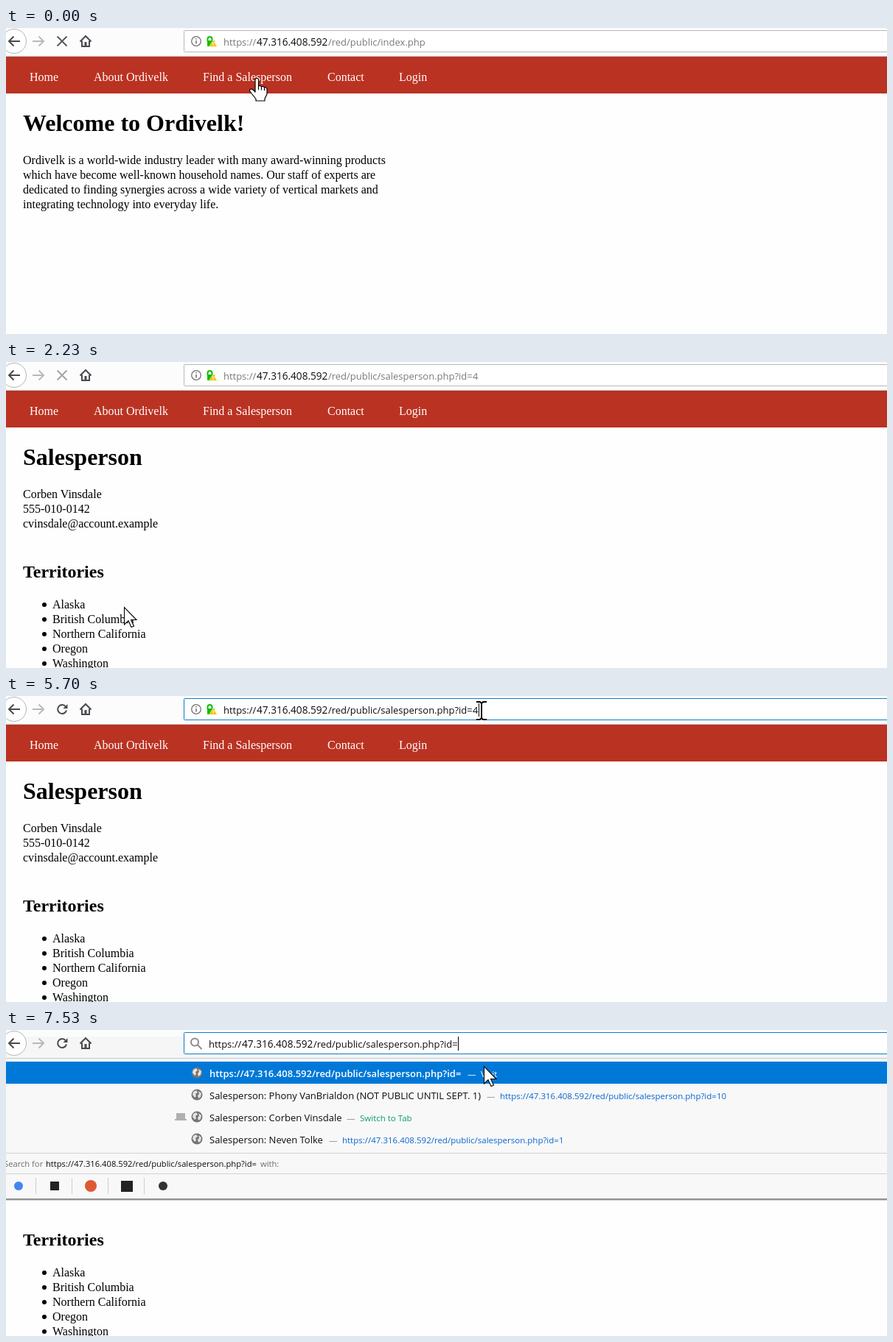
Recreate the animation shown at these times as an HTML page. Size 1195 by 416 pixels, loop 8000 ms.

```html
<!DOCTYPE html>
<html lang="en">
<head>
<meta charset="utf-8">
<title>Browser session</title>
<style>
html, body { margin: 0; width: 100%; height: 100%; overflow: hidden; background: #fff; }
svg { display: block; width: 1195px; height: 416px; }
.page { font: 16px "Liberation Serif", "Times New Roman", serif; }
.h1 { font-size: 32px; font-weight: bold; }
.h2 { font-size: 24px; font-weight: bold; }
.link { fill: #0000ee; text-decoration: underline; }
.ui { font: 13px "Open Sans", "Noto Sans", sans-serif; }
.host { font-size: 13.6px; }
.small { font-size: 11.5px; }
.line { fill: none; stroke: #4a4a4f; stroke-width: 2; }

/* Every layer runs on one shared 8 s clock with hard cuts. */
.a { animation: 8s step-end infinite; }

.home { animation-name: home; }
.list { animation-name: list; }
.person { animation-name: person; }
@keyframes home { 0% { visibility: visible } 3.375%, 100% { visibility: hidden } }
@keyframes list { 0% { visibility: hidden } 3.375% { visibility: visible } 26.125%, 100% { visibility: hidden } }
@keyframes person { 0% { visibility: hidden } 26.125%, 100% { visibility: visible } }

.stop { animation-name: stop; stroke-width: 1.8; }
.reload { animation-name: reload; }
@keyframes stop {
  0% { visibility: visible; stroke: #55555a }
  24.25% { visibility: visible; stroke: #a2a2a5 }
  8.625%, 36.375%, 100% { visibility: hidden }
}
@keyframes reload { 0%, 24.25% { visibility: hidden } 8.625%, 36.375%, 100% { visibility: visible } }

.url { animation-name: url; }
.dim { animation-name: dim; }
.host { animation-name: host; }
.path1 { animation-name: path1; }
.path2 { animation-name: path2; }
.path3 { animation-name: person; }
.digit { animation-name: digit; }
.select { animation-name: select; }
.field { animation-name: field; }
@keyframes url { 0% { transform: translate(295px, 24px) } 85.625%, 100% { transform: translate(275px, 24px) } }
@keyframes dim { 0% { fill: #797979 } 62.5%, 71.25%, 100% { fill: #0c0c0d } 64.375% { fill: #fff } }
@keyframes host { 0%, 71.25%, 100% { fill: #0c0c0d } 64.375% { fill: #fff } }
@keyframes path1 { 0% { visibility: visible } 1.75%, 100% { visibility: hidden } }
@keyframes path2 { 0% { visibility: hidden } 1.75% { visibility: visible } 26.125%, 100% { visibility: hidden } }
@keyframes digit { 0% { visibility: hidden } 26.125% { visibility: visible } 85.625%, 100% { visibility: hidden } }
@keyframes select { 0% { visibility: hidden } 64.375% { visibility: visible } 71.25%, 100% { visibility: hidden } }
@keyframes field { 0% { stroke: #b8b8b8 } 62.5%, 100% { stroke: #0f7bc8 } }

.caret { animation-name: caret; }
@keyframes caret {
  0%, 64.375%, 76.75%, 89.125% { visibility: hidden }
  62.5% { visibility: visible; transform: translateX(633px) }
  71.25%, 81.875% { visibility: visible; transform: translateX(641px) }
  85.625%, 94.125%, 100% { visibility: visible; transform: translateX(613px) }
}

.site { animation-name: site; }
.search { animation-name: search; }
.drop { animation-name: drop; }
@keyframes site { 0% { visibility: visible } 85.625%, 100% { visibility: hidden } }
@keyframes search { 0% { visibility: hidden } 85.625%, 100% { visibility: visible } }
@keyframes drop { 0% { visibility: hidden } 87.375%, 100% { visibility: visible } }

.pointer { animation-name: move; }
@keyframes move {
  0% { transform: translate(340px, 70px) }
  5.125% { transform: translate(338px, 92px) }
  6.875% { transform: translate(300px, 150px) }
  8.625% { transform: translate(232px, 228px) }
  10.375% { transform: translate(172px, 281px) }
  12.125% { transform: translate(168px, 293px) }
  13.875% { transform: translate(165px, 304px) }
  15.625% { transform: translate(162px, 320px) }
  17.25% { transform: translate(160px, 333px) }
  36.375% { transform: translate(175px, 320px) }
  38.25% { transform: translate(222px, 290px) }
  40% { transform: translate(290px, 250px) }
  41.875% { transform: translate(365px, 212px) }
  43.625% { transform: translate(432px, 178px) }
  45.5% { transform: translate(480px, 152px) }
  47.375% { transform: translate(513px, 135px) }
  49.125% { transform: translate(576px, 72px) }
  50.75% { transform: translate(606px, 48px) }
  52.5% { transform: translate(624px, 26px) }
  54.125% { transform: translate(632px, 21px) }
  55.75% { transform: translate(637px, 19px) }
  59.125% { transform: translate(640px, 19px) }
  64.375% { transform: translate(643px, 20px) }
  67.75% { transform: translate(645px, 20px) }
  74.875% { transform: translate(647px, 40px) }
  76.75%, 100% { transform: translate(648px, 49px) }
}
.hand { animation-name: hand; }
.arrow { animation-name: arrow; }
.beam { animation-name: beam; }
@keyframes hand { 0%, 15.625% { visibility: visible } 5.125%, 26.125%, 100% { visibility: hidden } }
@keyframes arrow { 0%, 15.625%, 52.5% { visibility: hidden } 5.125%, 26.125%, 74.875%, 100% { visibility: visible } }
@keyframes beam { 0%, 74.875%, 100% { visibility: hidden } 52.5% { visibility: visible } }
</style>
</head>
<body>
<svg viewBox="0 0 1195 416">
  <defs>
    <g id="globe">
      <circle r="7.5" fill="#747474"/>
      <path d="M-5-4L-1-6 1-3-2-1-1 2-3 4-6 0zM2-5L6-2 5 3 2 5 1 1 3-1z" fill="#e4e4e4"/>
    </g>
  </defs>
  <rect width="1195" height="416" fill="#fefefe"/>

  <g class="page">
    <rect y="39" width="1195" height="50" fill="#ba3222"/>
    <g fill="#fff">
      <text x="32" y="72">Home</text>
      <text x="119" y="72">About Ordivelk</text>
      <text x="267" y="72">Find a Salesperson</text>
      <text x="436" y="72">Contact</text>
      <text x="533" y="72">Login</text>
    </g>

    <g class="a home">
      <text class="h1" x="23" y="140">Welcome to Ordivelk!</text>
      <text x="23" y="185">Ordivelk is a world-wide industry leader with many award-winning products</text>
      <text x="23" y="205">which have become well-known household names. Our staff of experts are</text>
      <text x="23" y="225">dedicated to finding synergies across a wide variety of vertical markets and</text>
      <text x="23" y="245">integrating technology into everyday life.</text>
    </g>

    <g class="a list">
      <text class="h1" x="23" y="140">Find a Salesperson</text>
      <text x="23" y="185">Use the list below to find a salesperson nearby. We are ready to serve you!</text>
      <text x="23" y="221" font-weight="bold">UNITED STATES</text>
      <text x="23" y="257">Alabama (AL)</text>
      <text class="link" x="63" y="277">Neven Tolke</text>
      <text x="23" y="313">Alaska (AK)</text>
      <text class="link" x="63" y="333">Corben Vinsdale</text>
      <text x="23" y="369">Arizona (AZ)</text>
      <text class="link" x="63" y="389">Judit Fondel</text>
      <text x="23" y="425">Arkansas (AR)</text>
      <path d="M49 269h6v6h-6zM49 325h6v6h-6zM49 381h6v6h-6z"/>
    </g>

    <g class="a person">
      <text class="h1" x="23" y="140">Salesperson</text>
      <text x="23" y="185">Corben Vinsdale</text>
      <text x="23" y="205">555-010-0142</text>
      <text x="23" y="225">cvinsdale@account.example</text>
      <text class="h2" x="23" y="293">Territories</text>
      <text x="63" y="335">Alaska</text>
      <text x="63" y="355">British Columbia</text>
      <text x="63" y="375">Northern California</text>
      <text x="63" y="395">Oregon</text>
      <text x="63" y="415">Washington</text>
      <path d="M52 330h0M52 350h0M52 370h0M52 390h0M52 410h0" stroke="#000" stroke-width="6" stroke-linecap="round"/>
    </g>
  </g>

  <!-- toolbar -->
  <rect width="1195" height="38" fill="#fcfcfc"/>
  <rect class="a search" y="9" width="1195" height="29" fill="#f6f6f7"/>
  <rect y="38" width="1195" height="1" fill="#c6c6c6"/>
  <circle cx="11" cy="18" r="16.5" fill="#fff" stroke="#b5b5b5"/>
  <path class="line" d="M19 18H4M10.500 11.500L4 18l6.500 6.500"/>
  <path class="line" style="stroke:#b9b9b9" d="M36 18H51M44.500 11.500L51 18l-6.500 6.500"/>
  <path class="a stop" fill="none" d="M69.500 11.500l13 13M82.500 11.500l-13 13"/>
  <g class="a reload">
    <path class="line" d="M81 14.500A6 6 0 1 0 82 19.500"/>
    <path d="M83.500 11v6h-6z" fill="#4a4a4f"/>
  </g>
  <path class="line" d="M100.500 18.500L108 11l7.500 7.500M103 17.500V25h10V17.500"/>
  <path d="M106.500 19h3v6h-3z" fill="#4a4a4f"/>

  <rect class="a field" x="241.500" y="3.500" width="980" height="29" rx="1" fill="#fff" stroke="#b8b8b8"/>
  <g class="a site">
    <circle cx="258" cy="18" r="6.300" fill="none" stroke="#737373" stroke-width="1.300"/>
    <path d="M258 17v4.500M258 14v1.500" stroke="#737373" stroke-width="1.600"/>
    <path d="M273.500 18v-3a3 3 0 0 1 6 0v2" fill="none" stroke="#12bc00" stroke-width="2"/>
    <rect x="273" y="17" width="10" height="8" rx="1" fill="#12bc00"/>
    <path d="M281 16.500l5.500 9h-11z" fill="#ffbf00" stroke="#fff" stroke-width=".6"/>
    <path d="M281 19.500v3M281 23.300v1.200" stroke="#fff" stroke-width="1.200"/>
  </g>
  <g class="a search" fill="none" stroke="#8a8a8a" stroke-width="2">
    <circle cx="256" cy="16.500" r="5"/>
    <path d="M259.500 20l6 6"/>
  </g>
  <rect class="a select" x="295" y="9" width="346" height="19" fill="#0078d7"/>
  <g class="ui a url">
    <text class="a dim">https://</text>
    <text class="a host" x="45">47.316.408.592</text>
    <g class="a dim">
      <text class="a path1" x="142">/red/public/index.php</text>
      <text class="a path2" x="142">/red/public/territories.php</text>
      <text class="a path3" x="142">/red/public/salesperson.php?id=</text>
      <text class="a digit" x="338">4</text>
    </g>
  </g>
  <rect class="a caret" y="9" width="1" height="19"/>

  <!-- suggestions -->
  <g class="ui a drop">
    <rect y="39" width="1195" height="191" fill="#f8f8f8"/>
    <rect y="43" width="1195" height="30" fill="#0078d7"/>
    <path d="M0 167.500H1195M0 195.500H1195" stroke="#d2d2d2"/>
    <rect y="229" width="1195" height="2" fill="#929292"/>
    <rect y="231" width="1195" height="1" fill="#cfcfcf"/>
    <path d="M40.500 201v22M89.500 201v22M138.500 201v22M187.500 201v22" stroke="#cfcfcf"/>
    <use href="#globe" x="259" y="58"/>
    <use href="#globe" x="259" y="88"/>
    <use href="#globe" x="259" y="118"/>
    <use href="#globe" x="259" y="148"/>
    <path d="M231 113h12v8h2v2h-16v-2h2z" fill="#b0b0b0"/>

    <g fill="#fff">
      <text x="276" y="64" font-weight="600">https://47.316.408.592/red/public/salesperson.php?id=</text>
      <text class="small" x="626" y="64">—</text>
      <text class="small" x="644" y="64">Visit</text>
    </g>
    <g fill="#0c0c0d">
      <text x="276" y="94">Salesperson: Phony VanBrialdon (NOT PUBLIC UNTIL SEPT. 1)</text>
      <text x="276" y="124">Salesperson: Corben Vinsdale</text>
      <text x="276" y="154">Salesperson: Neven Tolke</text>
    </g>
    <g class="small" fill="#8a8a8a">
      <text x="652" y="94">—</text>
      <text x="462" y="124">—</text>
      <text x="438" y="154">—</text>
    </g>
    <g class="small" fill="#0a66cf">
      <text x="670" y="94">https://47.316.408.592/red/public/salesperson.php?id=10</text>
      <text x="480" y="124" fill="#0c9a72">Switch to Tab</text>
      <text x="456" y="154">https://47.316.408.592/red/public/salesperson.php?id=1</text>
    </g>
    <g style="font-size:11.2px" fill="#6c6c6c">
      <text x="-3" y="186">Search for</text>
      <text x="54" y="186" fill="#0c0c0d">https://47.316.408.592/red/public/salesperson.php?id=</text>
      <text x="345" y="186">with:</text>
    </g>
    <circle cx="17" cy="212" r="6" fill="#4285f4"/>
    <rect x="60" y="206" width="12" height="12" fill="#222"/>
    <circle cx="115" cy="212" r="8" fill="#de5833"/>
    <rect x="156" y="205" width="16" height="15" fill="#222"/>
    <circle cx="213" cy="212" r="6" fill="#333"/>
  </g>

  <!-- pointer -->
  <g class="a pointer">
    <path class="a arrow" d="M.5.5V24L6 18.800 10 27.500 13.500 26 9.500 17.500H17z" fill="#fff" stroke="#000" stroke-width="1.100"/>
    <g class="a hand" fill="#fff" stroke="#000" stroke-width="1.200" stroke-linejoin="round">
      <path d="M-2 16V.500a2.200 2.200 0 0 1 4.500 0V9q2-1.500 4 .8 2.500-1.200 4 1 3-.8 3.500 2V20l-3 6v3H-1v-2.500L-8.500 17q-2-3 .5-4 2-.5 6 4z"/>
      <path d="M2.500 9v5M6.500 10v4.500M10.500 11v4" fill="none"/>
    </g>
    <g class="a beam" fill="none">
      <path d="M-7-12h5l2 2 2-2h5M0-10V10M-7 12h5l2-2 2 2h5" stroke="#fff" stroke-width="4"/>
      <path d="M-7-12h5l2 2 2-2h5M0-10V10M-7 12h5l2-2 2 2h5" stroke="#000" stroke-width="2"/>
    </g>
  </g>
</svg>
</body>
</html>
```
